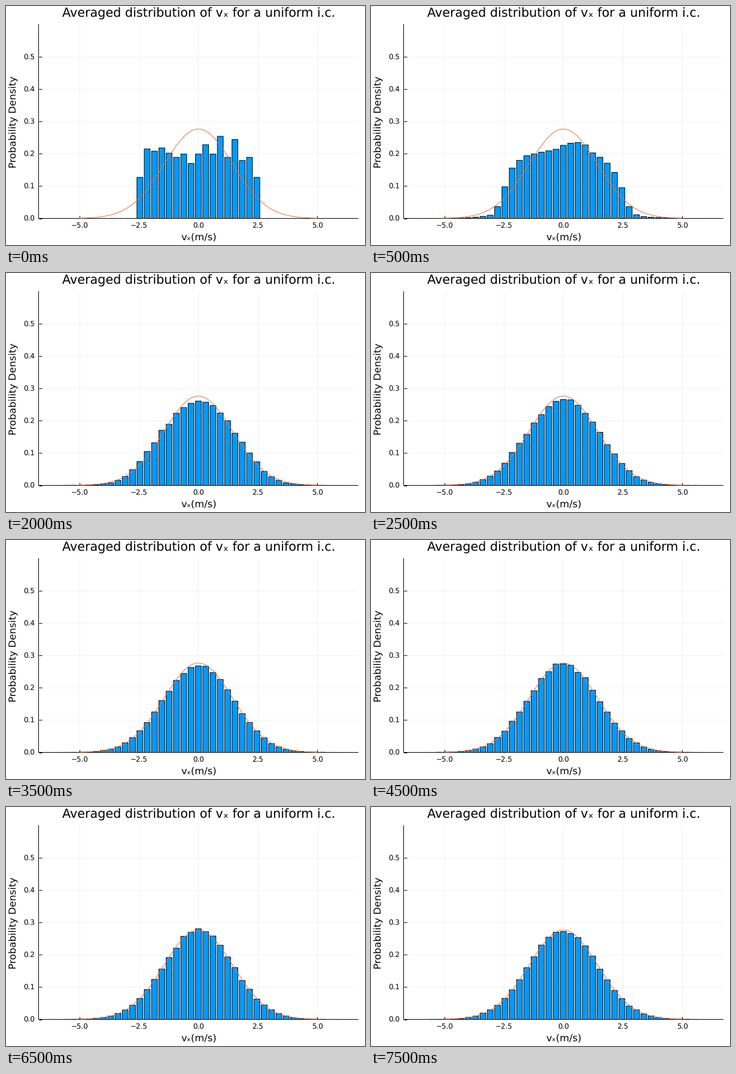
Animation of 600x400 px, one loop 8000 ms. Source, as a matplotlib script:

```python
import matplotlib.pyplot as plt
import numpy as np
from matplotlib.animation import FuncAnimation

plt.rcParams["font.family"] = "DejaVu Sans"
plt.rcParams["text.hinting"] = "none"

W, H, DPI = 600, 400, 100
PX = 72 / DPI                       # one pixel in points
LEFT, RIGHT, TOP, BASE = 54.5, 588.5, 30.9, 355.5
XMAX, YMAX = 6.715, 0.6
STEP, PEAK = 0.3073, 0.2765         # bin spacing, height of the normal curve
STEPS = 16
TITLE, LABEL, TICK = 20.78, 16.33, 11.88

# Initial histogram, in thousandths
START = [127, 215, 208, 218, 202, 189, 199, 170, 199,
         228, 199, 254, 189, 244, 179, 189, 127]

bins = np.arange(-20, 21)
centers = bins * STEP
start = np.zeros(len(bins))
start[np.abs(bins) <= 8] = np.array(START) / 1000


def gauss(x):
    return PEAK * np.exp(-np.pi * (PEAK * x) ** 2)


def heights(step):
    """The start spreads out and fades into a noisy normal distribution."""
    if step == 0:
        return start
    spread = start
    for _ in range(step):
        spread = np.convolve(spread, [0.25, 0.5, 0.25], mode="same")
    rest = np.exp(-0.43 * step)
    h = rest * spread + (1 - rest) * gauss(centers)
    noise = np.random.default_rng(step).normal(0, 0.003, len(h))
    return np.clip(h + noise * np.sqrt(h / PEAK), 0, 0.283)


fig = plt.figure(figsize=(W / DPI, H / DPI), dpi=DPI, facecolor="white")
ax = fig.add_axes([LEFT / W, 1 - BASE / H, (RIGHT - LEFT) / W, (BASE - TOP) / H])
ax.set(xlim=(-XMAX, XMAX), ylim=(0, YMAX))
xticks, yticks = np.arange(-5, 5.1, 2.5), np.arange(6) / 10
ax.set_xticks(xticks, [])
ax.set_yticks(yticks, [])
ax.tick_params(direction="in", length=5 * PX, width=PX)
ax.grid(color="black", alpha=0.1, linewidth=0.5 * PX)
ax.set_axisbelow(True)
ax.spines[["top", "right"]].set_visible(False)
for side in ("left", "bottom"):
    ax.spines[side].set(linewidth=PX, snap=False)


def label(x, y, text, size, ha="center", **kw):
    fig.text(x / W, 1 - y / H, text, fontsize=size * PX, ha=ha, va="baseline", **kw)


label(322.5, 18.3, "Averaged distribution of vₓ for a uniform i.c.", TITLE)
label(322, 391.7, "vₓ(m/s)", LABEL)
label(17, 194, "Probability Density", LABEL, rotation=90, rotation_mode="anchor")
for x in xticks:
    px = LEFT + (x + XMAX) / (2 * XMAX) * (RIGHT - LEFT)
    label(px, 372, f"{x:.1f}".replace("-", "−"), TICK)
for y in yticks:
    py = BASE - y / YMAX * (BASE - TOP)
    label(48, py + 4.4, f"{y:.1f}", TICK, ha="right")

bars = ax.bar(centers, heights(0), width=0.8 * STEP, color="#009AFA",
              edgecolor="black", linewidth=PX, zorder=2.2, snap=False)
xs = np.linspace(-5, 5, 300)
ax.plot(xs, gauss(xs), color="#E26F46", linewidth=PX, zorder=4)


def update(step):
    for bar, h in zip(bars, heights(step)):
        bar.set_height(h)
    return list(bars)


anim = FuncAnimation(fig, update, frames=STEPS, interval=500,
                     repeat=True, repeat_delay=0, blit=False)
plt.show()
```
